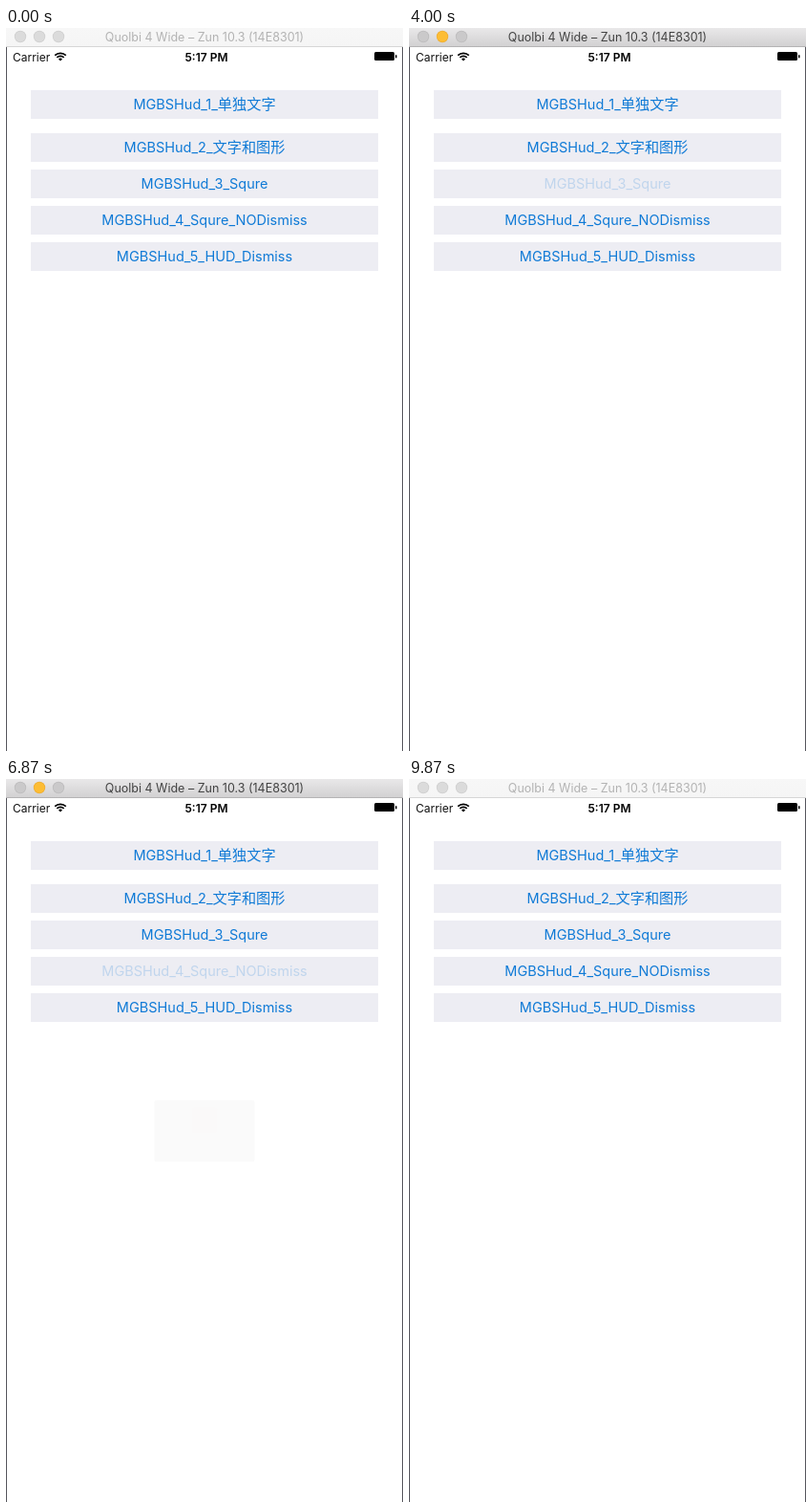
Write an HTML page with a canvas that moves like this. It is 416 px wide and 756 px high and loops after 9940 ms.

```html
<!DOCTYPE html>
<html lang="zh">
<head>
<meta charset="utf-8">
<title>HUD demo</title>
<style>
  html, body { margin: 0; width: 100%; height: 100%; overflow: hidden; background: #fff; }
  canvas { display: block; width: 416px; height: 756px; }
</style>
</head>
<body>
<canvas id="stage" width="416" height="756"></canvas>
<script>
const ctx = document.getElementById('stage').getContext('2d');
const LOOP = 9940, STEP = 1000 / 15;
const LATIN = 'Inter, "Open Sans", sans-serif';
const CJK = '"Noto Sans CJK SC", "Noto Sans CJK", "Noto Sans CJK JP", sans-serif';

const buttons = [
  { y: 65, label: 'MGBSHud_1_单独文字', down: 460, up: 560 },
  { y: 110, label: 'MGBSHud_2_文字和图形', down: 1525, up: 1700 },
  { y: 148, label: 'MGBSHud_3_Squre', down: 3925, up: 4030 },
  { y: 186, label: 'MGBSHud_4_Squre_NODismiss', down: 6725, up: 6862 },
  { y: 224, label: 'MGBSHud_5_HUD_Dismiss', down: 8725, up: 8830 }
];

const huds = [
  { x: 131, y: 353, w: 154, h: 30, r: 2, show: 560, hide: 2440, draw: drawHello },
  { x: 80, y: 700, w: 255, h: 31, r: 2, show: 1700, hide: 3600, draw: drawNotice },
  { x: 105, y: 314, w: 206, h: 108, r: 5, show: 4040, hide: 6100, draw: drawLoading },
  { x: 105, y: 305, w: 206, h: 126, r: 5, show: 6858, hide: 8840, draw: drawSuccess }
];

function box(x, y, w, h, r, color) {
  ctx.fillStyle = color;
  ctx.beginPath();
  ctx.roundRect(x, y, w, h, r);
  ctx.fill();
}

function disc(x, y, r, color) {
  ctx.fillStyle = color;
  ctx.beginPath();
  ctx.arc(x, y, r, 0, Math.PI * 2);
  ctx.fill();
}

function arc(x, y, r, from, to, width, color) {
  ctx.strokeStyle = color;
  ctx.lineWidth = width;
  ctx.beginPath();
  ctx.arc(x, y, r, from, to);
  ctx.stroke();
}

// Latin and Chinese runs use their own font and size.
function text(str, x, y, color, { size = 14.5, cjk = 15.2, weight = 400, center = true } = {}) {
  const runs = str.split(/([\u4e00-\u9fff]+)/).filter(Boolean).map(s => {
    const han = /[\u4e00-\u9fff]/.test(s);
    const font = `${weight} ${han ? cjk : size}px ${han ? CJK : LATIN}`;
    ctx.font = font;
    return { s, font, width: ctx.measureText(s).width };
  });
  if (center) x -= runs.reduce((sum, run) => sum + run.width, 0) / 2;
  ctx.fillStyle = color;
  for (const run of runs) {
    ctx.font = run.font;
    ctx.fillText(run.s, x, y);
    x += run.width;
  }
}

function drawTitleBar(active) {
  const shade = ctx.createLinearGradient(0, 0, 0, 19);
  shade.addColorStop(0, active ? '#e9e8e9' : '#f7f7f7');
  shade.addColorStop(1, active ? '#d2d1d2' : '#f5f5f5');
  ctx.fillStyle = shade;
  ctx.fillRect(0, 0, 416, 19);
  ctx.fillStyle = active ? '#b5b4b5' : '#d6d6d6';
  ctx.fillRect(0, 19, 416, 1);
  for (const x of [15, 35, 55]) {
    const lit = active && x === 35;
    disc(x, 9, 6.2, lit ? '#eeae33' : active ? '#bdbcbd' : '#cfcfcf');
    disc(x, 9, 5.4, lit ? '#fdbd34' : active ? '#cac9ca' : '#dbdbdb');
  }
  text('Quolbi 4 Wide – Zun 10.3 (14E8301)', 208, 13.6, active ? '#434343' : '#b3b3b3', { size: 12.5 });
}

function drawStatusBar() {
  text('Carrier', 7, 34.5, '#111', { size: 12, center: false });
  text('5:17 PM', 210, 34.5, '#000', { size: 12, weight: 600 });
  const from = -Math.PI * 0.75, to = -Math.PI * 0.25;
  arc(57, 34.5, 8.2, from, to, 1.7, '#000');
  arc(57, 34.5, 5.2, from, to, 1.7, '#000');
  arc(57, 34.5, 1.4, from, to, 2.8, '#000');
  box(386, 25, 21, 9, 1.5, '#000');
  box(408, 28, 1.5, 3.5, 0.7, '#000');
}

function drawEdges() {
  ctx.fillStyle = '#55555c';
  ctx.fillRect(0, 20, 1, 736);
  ctx.fillRect(415, 20, 1, 736);
}

function labelAlpha(b, t) {
  if (t < b.down) return 1;
  const p = Math.min(1, Math.max(0, (t - b.up) / 470));
  return 0.2 + 0.8 * p * p * (3 - 2 * p);
}

function drawButton(b, t) {
  ctx.fillStyle = '#ededf3';
  ctx.fillRect(26, b.y, 364, 30);
  ctx.globalAlpha = labelAlpha(b, t);
  text(b.label, 208, b.y + 20.2, '#0f7ad6');
  ctx.globalAlpha = 1;
}

function drawHello() {
  text('Hello_World!!!', 208, 374.8, '#fff', { size: 18.6 });
}

function drawNotice() {
  disc(106, 716, 10.7, '#32cb35');
  ctx.strokeStyle = '#1d5a20';
  ctx.lineWidth = 1.2;
  ctx.beginPath();
  ctx.moveTo(101, 716.5);
  ctx.lineTo(104.5, 720);
  ctx.lineTo(111.5, 712);
  ctx.stroke();
  text('Hi_This is HUD With Img ...', 127, 721, '#fff', { center: false });
}

function drawLoading(t) {
  const from = Math.PI * (0.61 + 2 * (t - 5800) / 1000);
  ctx.save();
  ctx.lineCap = 'round';
  ctx.shadowColor = '#f00';
  ctx.shadowBlur = 5;
  arc(208, 356, 17, from, from + Math.PI, 3.6, '#f40606');
  ctx.restore();
  text('加载失败...', 208, 403.5, '#fff');
}

function drawSuccess() {
  box(182, 320, 52, 52, 5, '#ece7dd');
  text('加载成功', 208, 409, '#fff', { cjk: 30 });
}

// Critically damped spring, settling in about 0.3 s.
function spring(ms) {
  const x = Math.max(0, ms) * 0.026;
  return 1 - (1 + x) * Math.exp(-x);
}

function drawHud(hud, t) {
  if (t < hud.show || t > hud.hide + 300) return;
  const p = spring(t - hud.show) * (1 - spring(t - hud.hide));
  const cx = hud.x + hud.w / 2, cy = hud.y + hud.h / 2;
  const scale = p > 0.995 ? 1 : 0.5 + 0.5 * p;
  ctx.save();
  ctx.globalAlpha = p > 0.995 ? 1 : p;
  ctx.translate(cx, cy);
  ctx.scale(scale, scale);
  ctx.translate(-cx, -cy);
  box(hud.x, hud.y, hud.w, hud.h, hud.r, '#333');
  hud.draw(t);
  ctx.restore();
}

function render(now) {
  const t = Math.floor((now % LOOP + 5) / STEP) * STEP;
  ctx.fillStyle = '#fff';
  ctx.fillRect(0, 0, 416, 756);
  drawTitleBar(t > 60 && t < 9860);
  drawStatusBar();
  drawEdges();
  buttons.forEach(b => drawButton(b, t));
  huds.forEach(hud => drawHud(hud, t));
}

const start = performance.now();
function tick() {
  render(performance.now() - start);
  requestAnimationFrame(tick);
}
tick();
</script>
</body>
</html>
```
